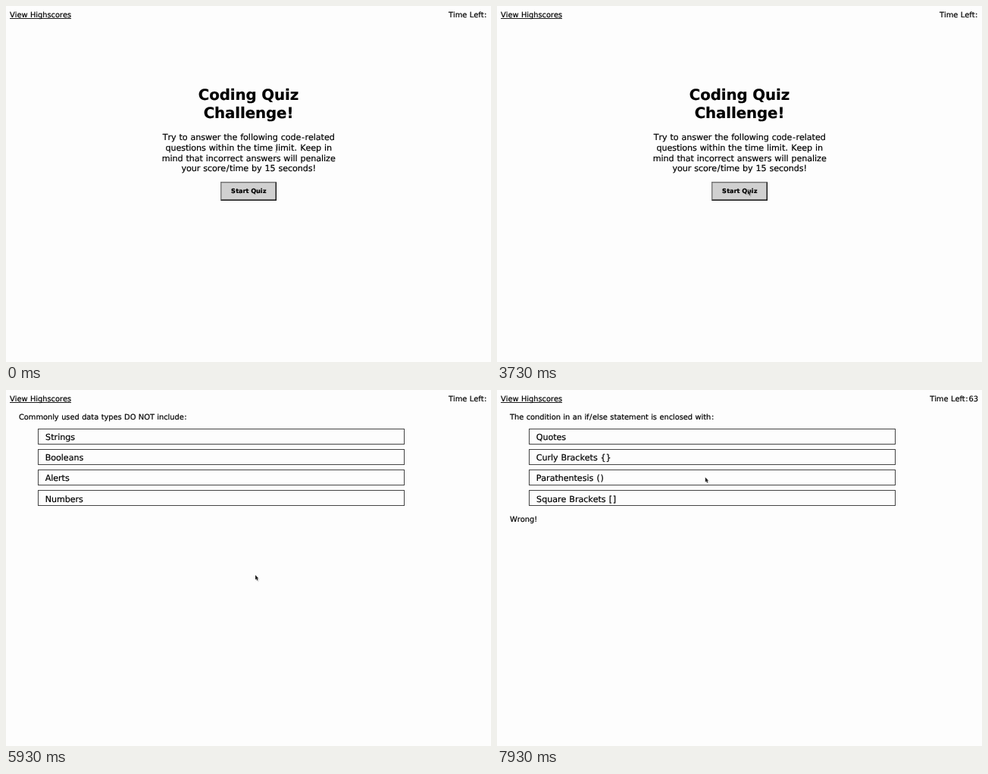
Animation, 640 px wide and 470 px high, one loop 8000 ms. Source, as an HTML page:

```html
<!DOCTYPE html>
<html lang="en">
<head>
<meta charset="utf-8">
<title>Coding quiz</title>
<style>
  html, body { margin: 0; width: 100%; height: 100%; overflow: hidden; background: #fdfdfd; }
  svg { display: block; }
  text {
    font-family: "DejaVu Sans", Verdana, sans-serif;
    letter-spacing: -.005em; word-spacing: .038em; font-kerning: none;
    text-rendering: geometricPrecision; white-space: pre;
    stroke: #000; stroke-width: .2px;
  }
  .small { font-size: 9.9px; }
  .body { font-size: 11.15px; }
  .title { font-size: 19.8px; font-weight: bold; letter-spacing: -.005em; word-spacing: 0; }
  .label { font-size: 8.2px; font-weight: bold; word-spacing: 0; }
  .mid { text-anchor: middle; }
  .end { text-anchor: end; }
</style>
</head>
<body>
<svg id="stage" width="640" height="470" viewBox="0 0 640 470">
  <rect width="640" height="470" fill="#fdfdfd"/>
  <g id="header"><rect x="5" y="16" width="81" height=".9"/></g>
  <g id="intro">
    <rect x="283" y="232" width="74" height="25" fill="#d0d0d0"/>
    <path id="lit" d="M283 257V232H357L355.6 233.4H284.4V255.6Z"/>
    <path id="shade" d="M357 232V257H283L284.4 255.6H355.6V233.4Z"/>
  </g>
  <g id="quiz"></g>
  <g id="arrow">
    <path d="M.8 1.2V8.4L2.4 7 3.4 9.4 4.8 8.8 4 6.6H6Z" fill="#000" opacity=".13"/>
    <path d="M0 0V6.2L1.4 5 2.4 7.4 3.6 6.9 2.6 4.6H4.4Z" fill="#222" stroke="#fff" stroke-width=".7" paint-order="stroke"/>
  </g>
  <path id="beam" d="M-1.5 -4.5Q0 -4.5 0 -3.5Q0 -4.5 1.5 -4.5M0 -3.5V3.5M-1.5 4.5Q0 4.5 0 3.5Q0 4.5 1.5 4.5M-1 1.2H1" fill="none" stroke="#777" stroke-width=".7"/>
</svg>
<script>
const LOOP = 8000, PRESS = 5800, BEGIN = 5930, TICK = 6930, ANSWER = 7060, PENALTY = 7930;

// time, x, y of the pointer tip; it jumps from stop to stop
const stops = [
  [0, 356.5, 188.7], [400, 319.7, 204], [660, 319, 228], [1130, 317, 242.5],
  [1330, 316.5, 243], [1730, 316, 246.5], [2000, 332, 243], [2200, 332, 243.3],
  [2400, 331, 242.8], [2930, 330.8, 244.5], [3730, 330.8, 242.8], [4660, 329, 243.2],
  [5660, 329.3, 243.6], [5930, 329, 244.2], [6200, 328.8, 244.6], [6400, 287, 106],
  [6800, 275.8, 93.6], [7460, 275, 114.6], [7660, 274.8, 115.2]
];
const BEAM_END = 660;

const questions = [
  ["Commonly used data types DO NOT include:", "Strings", "Booleans", "Alerts", "Numbers"],
  ["The condition in an if/else statement is enclosed with:", "Quotes",
    "Curly Brackets {}", "Parathentesis ()", "Square Brackets []"]
];

// extra side space, in em, for glyphs that are set wider
const pads = { ":": .058, "/": .058, "-": .047, ".": .023, S: .024, "(": .03, ")": .03, "[": .03, "]": .03 };

const $ = id => document.getElementById(id);

function add(parent, tag, attrs, content = "") {
  const el = document.createElementNS("http://www.w3.org/2000/svg", tag);
  for (const key in attrs) el.setAttribute(key, attrs[key]);
  el.textContent = content;
  parent.appendChild(el);
  return el;
}

function write(parent, cls, x, y, str) {
  const el = add(parent, "text", { class: cls, x, y });
  for (const part of str.split(/([:\/\-.S()[\]])/)) {
    const pad = pads[part];
    if (pad) add(el, "tspan", { dx: pad + "em", style: `letter-spacing:${pad}em` }, part);
    else if (part) el.append(part);
  }
  return el;
}

function build() {
  write($("header"), "small", 5, 15, "View Highscores");
  const left = write($("header"), "small", 584, 15, "Time Left:");
  const count = write($("header"), "small end", 635, 15, "");

  const intro = $("intro");
  ["Coding Quiz", "Challenge!"].forEach((s, i) => write(intro, "title mid", 320, 124 + i * 24.2, s));
  ["Try to answer the following code-related",
    "questions within the time limit. Keep in",
    "mind that incorrect answers will penalize",
    "your score/time by 15 seconds!"
  ].forEach((s, i) => write(intro, "body mid", 320.2, 177.4 + i * 13.65, s));
  write(intro, "label mid", 320, 247.4, "Start Quiz");

  const pages = questions.map(([ask, ...options]) => {
    const page = add($("quiz"), "g", {});
    write(page, "small", 17, 39, ask);
    options.forEach((s, i) => {
      const y = 51.5 + i * 27;
      add(page, "rect", { x: 42.5, y, width: 483, height: 20, fill: "none", stroke: "#444" });
      write(page, "body", 51.7, 65.9 + i * 27.25, s);
    });
    return page;
  });
  write(pages[1], "small", 17, 173.7, "Wrong!");
  return { left, count, pages };
}

const { left, count, pages } = build();
const show = (el, on) => el.setAttribute("visibility", on ? "visible" : "hidden");

function render(t) {
  show($("intro"), t < BEGIN);
  show(pages[0], t >= BEGIN && t < ANSWER);
  show(pages[1], t >= ANSWER);

  const pressed = t >= PRESS;
  $("lit").setAttribute("fill", pressed ? "#111" : "#777");
  $("shade").setAttribute("fill", pressed ? "#777" : "#111");

  const ticking = t >= TICK;
  left.setAttribute("x", ticking ? 571.2 : 584);
  count.textContent = !ticking ? "" : t < PENALTY ? "74" : "63";

  const [, x, y] = stops.filter(s => s[0] <= t).pop();
  const beam = t < BEAM_END;
  show($("beam"), beam);
  show($("arrow"), !beam);
  $(beam ? "beam" : "arrow").setAttribute("transform", `translate(${x} ${y})`);
}

const start = performance.now();
function frame() {
  render((performance.now() - start) % LOOP);
  requestAnimationFrame(frame);
}
render(0);
requestAnimationFrame(frame);
</script>
</body>
</html>
```
